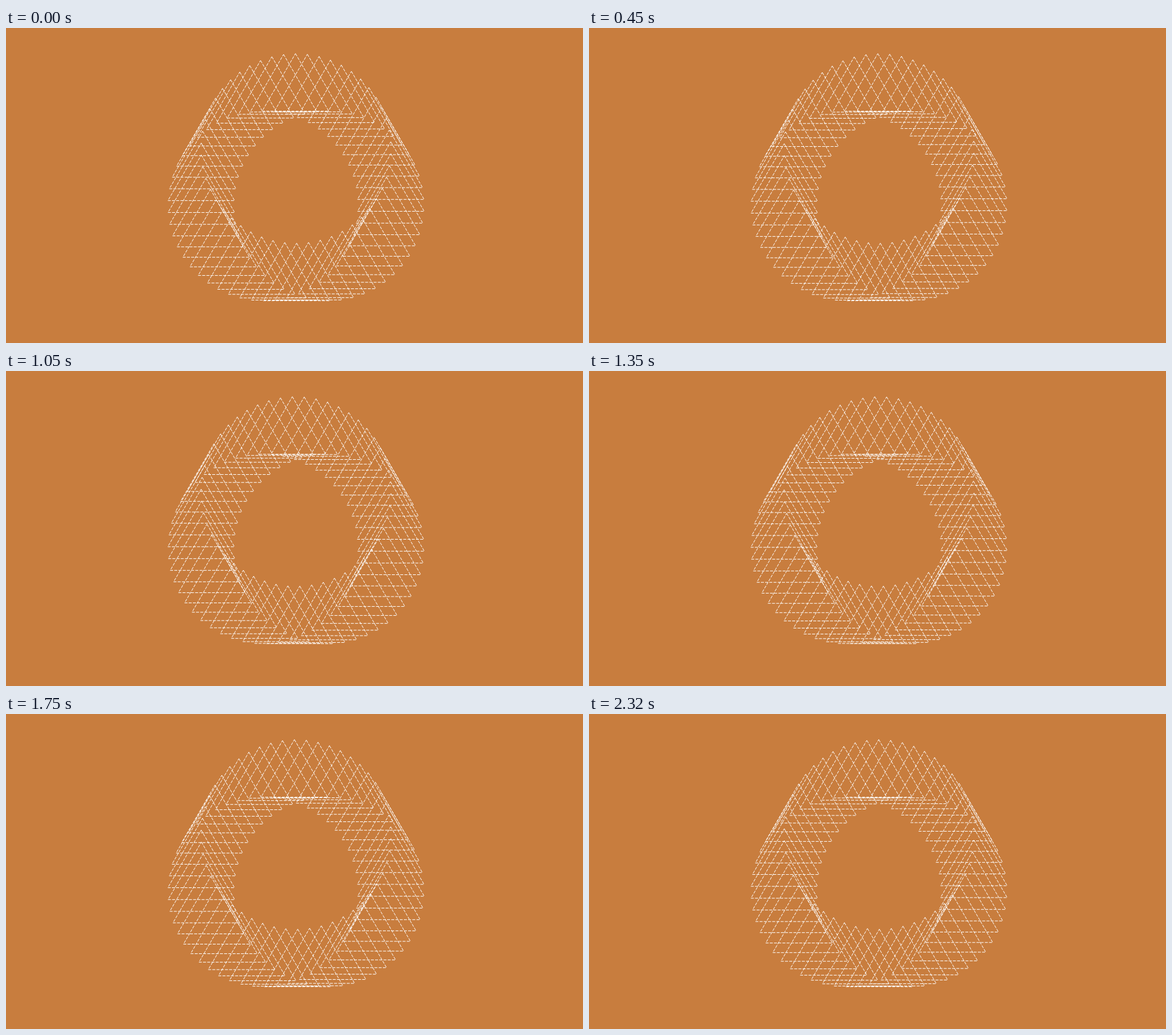
An HTML page that plays this animation: 960 px wide and 525 px high, repeating every 2.38 s.

```html
<!DOCTYPE html>
<html lang="en">
<head>
<meta charset="utf-8">
<title>Ring of triangles</title>
<style>
  html, body { margin: 0; width: 100%; height: 100%; overflow: hidden; background: #c87d3e; }
  svg { display: block; width: 960px; height: 525px; }
  path { fill: none; stroke: #fff; stroke-width: 1; stroke-dasharray: 5 2; }
</style>
</head>
<body>
<svg id="stage" viewBox="0 0 960 525"></svg>
<script>
  const COUNT = 50, RADIUS = 158, CX = 482.6, CY = 264.6;
  const SIDE = 64, HALF = SIDE * Math.sqrt(3) / 2;
  const LOOP = 2380, STEP = 50, LAST = 2320;
  const START = 0.05;

  // [step, distance travelled in triangle spacings]
  const KEYS = [[0, 0], [9, 3.054], [16, 5.555], [27, 9.313], [35, 12.09], [42, 14.592], [46, 15.976]];

  const stage = document.getElementById('stage');
  const triangles = Array.from({ length: COUNT }, () => {
    const path = document.createElementNS('http://www.w3.org/2000/svg', 'path');
    path.setAttribute('d', `M0 ${-SIDE}L${HALF} ${SIDE / 2}L${-HALF} ${SIDE / 2}Z`);
    return stage.appendChild(path);
  });

  function travel(step) {
    const i = Math.max(1, KEYS.findIndex(key => key[0] >= step));
    const [s0, d0] = KEYS[i - 1], [s1, d1] = KEYS[i];
    return d0 + (d1 - d0) * (step - s0) / (s1 - s0);
  }

  function place(step) {
    const shift = START + travel(step);
    triangles.forEach((path, i) => {
      const angle = (i - shift) / COUNT * 2 * Math.PI;
      const x = CX + RADIUS * Math.sin(angle);
      const y = CY - RADIUS * Math.cos(angle);
      path.setAttribute('transform', `translate(${x.toFixed(3)} ${y.toFixed(3)})`);
    });
  }

  let begin = null, shown = -1;
  function tick(now) {
    if (begin === null) begin = now;
    const t = (now - begin) % LOOP;
    const step = t >= LAST ? 46 : Math.min(45, Math.floor(t / STEP));
    if (step !== shown) place(shown = step);
    requestAnimationFrame(tick);
  }

  place(0);
  requestAnimationFrame(tick);
</script>
</body>
</html>
```
